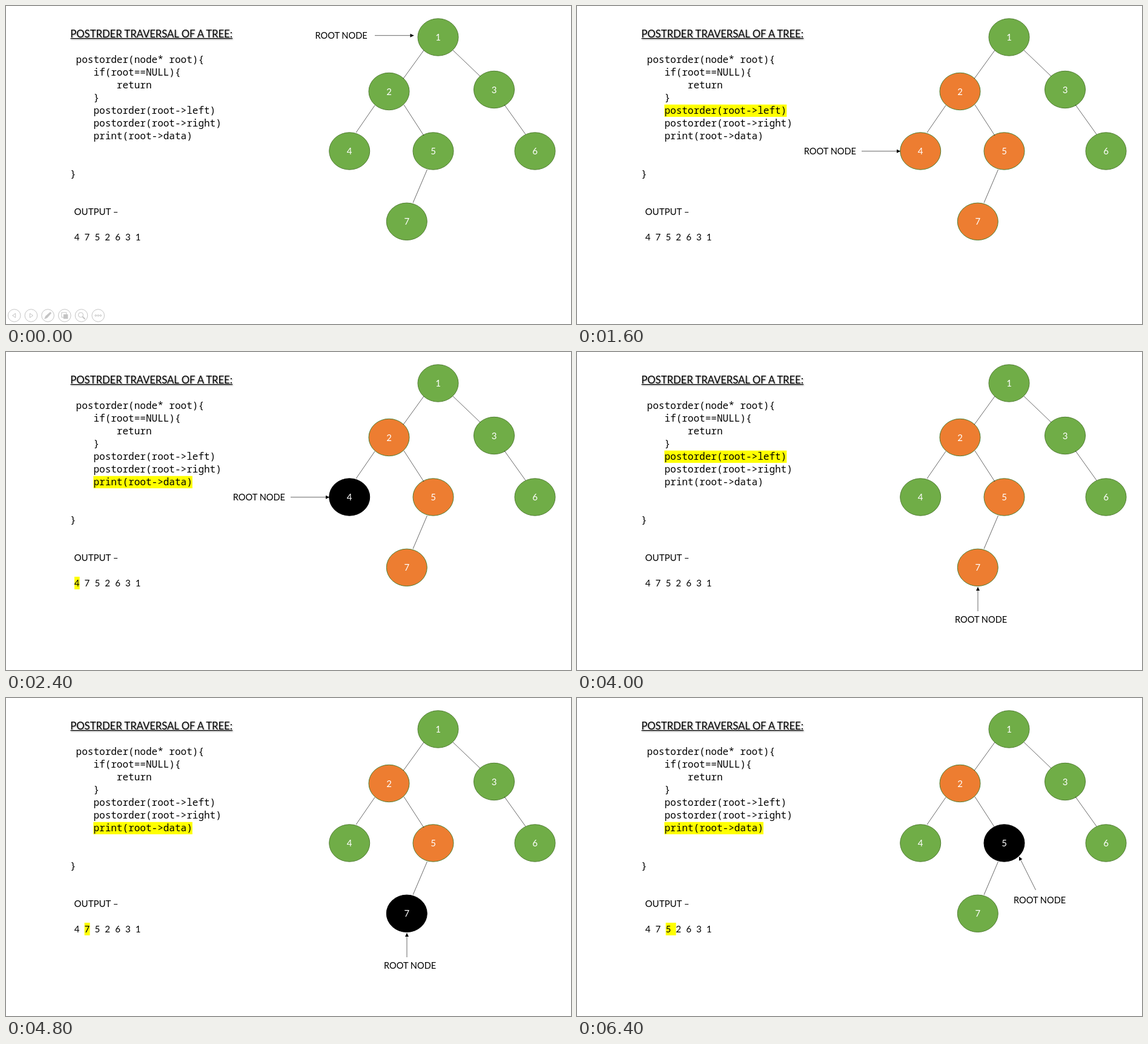
Recreate the animation shown at these times as an HTML page. Size 933 px wide and 525 px high, loop 8000 ms.

```html
<!DOCTYPE html>
<html lang="en">
<head>
<meta charset="utf-8">
<title>Tree traversal</title>
<style>
html, body { margin: 0; width: 100%; height: 100%; overflow: hidden; background: #fff; }
svg { display: block; width: 100%; height: 100%; }
text { font: 15px Lato, sans-serif; white-space: pre; }
.code { font: 16.03px "Noto Sans Mono", monospace; font-variant-ligatures: none; }
.title { font-size: 16.65px; }
.label { font-size: 14.6px; }
.head { filter: drop-shadow(1.5px 1.5px 1px #0006); }
.digit { text-anchor: middle; }
.mark { fill: #ff0; }
.line { stroke: #000; stroke-width: .6; fill: none; }
.bar { fill: #fff; stroke: #c4c4c4; }
.bar .solid { fill: #c4c4c4; stroke: none; }
</style>
</head>
<body>
<svg id="stage" viewBox="0 0 933 525" xmlns="http://www.w3.org/2000/svg"></svg>
<script>
const CODE = [
  " postorder(node* root){",
  "    if(root==NULL){",
  "        return",
  "    }",
  "    postorder(root->left)",
  "    postorder(root->right)",
  "    print(root->data)",
  "", "",
  "}"
];
const LEFT = 4, RIGHT = 5, PRINT = 6;
const CHAR = 9.618, ROW = 21;
const GREEN = "#70ad47", ORANGE = "#ed7d31", EDGE = "#507e32";
const NODES = [[713.5, 51.5], [632.5, 141], [806, 138], [567.2, 239.5],
               [705.5, 239.5], [873.5, 239.5], [661.8, 355.8]];
const EDGES = "M690 73L656 120M738 73L783 116M609 164L578 209" +
              "M657 163L690 214M823 163L858 212M695.5 270L672 325";
// label x, label baseline, arrow tail, arrow tip
const POINTERS = {
  one: [510.5, 54, 609, 48.7, 673.5, 48.7],
  two: [442.5, 140.5, 534, 135.3, 598.5, 135.3],
  four: [374.8, 245, 470, 239.7, 534, 239.7],
  five: [716.8, 336, 753.5, 313, 730, 262],
  fiveLow: [721, 339, 757.5, 317, 730, 262],
  seven: [624, 447.3, 662, 428, 662, 388]
};
// start ms, pointer, marked code row, orange nodes, printed node, output mark [x, width]
const STEPS = [
  [0, "one", 0, "", 0],
  [800, "two", LEFT, "2457", 0],
  [1600, "four", LEFT, "2457", 0],
  [2400, "four", PRINT, "257", 4, [113, 8.6]],
  [3200, "five", RIGHT, "257", 0],
  [4000, "seven", LEFT, "257", 0],
  [4800, "seven", PRINT, "25", 7, [129.6, 8.9]],
  [5600, "fiveLow", RIGHT, "25", 0],
  [6400, "fiveLow", PRINT, "2", 5, [146.6, 16.9]]
];
const LOOP = 8000;

const text = (x, y, s, cls = "", fill = "#000") =>
  `<text x="${x}" y="${y}" class="${cls}" fill="${fill}">${s.replace(/>/g, "&gt;")}</text>`;
const mark = (x, y, w, h) => `<rect class="mark" x="${x}" y="${y}" width="${w}" height="${h}"/>`;

function node([x, y], i, orange, printed) {
  const id = i + 1, black = id === printed;
  const fill = black ? "#000" : orange.includes(id) ? ORANGE : GREEN;
  return `<ellipse cx="${x}" cy="${y}" rx="33.5" ry="30.7" fill="${fill}" stroke="${black ? "#000" : EDGE}"/>`
    + text(x, y + 5.5, `${id}`, "digit", "#fff");
}

function pointer([lx, ly, x1, y1, x2, y2]) {
  const angle = Math.atan2(y2 - y1, x2 - x1) * 180 / Math.PI;
  return text(lx, ly, "ROOT NODE", "label")
    + `<path class="line" d="M${x1} ${y1}L${x2} ${y2}"/>`
    + `<path d="M0 0L-6 -3V3Z" transform="translate(${x2} ${y2}) rotate(${angle})"/>`;
}

function controls() {
  const icons = [
    '<path d="M2 -3.5V3.5L-3 0Z"/>',
    '<path d="M-2 -3.5V3.5L3 0Z"/>',
    '<path class="solid" d="M-6 6L-4 1L4 -6L6 -4L-1 4Z"/>',
    '<path d="M-5 -5H3V3H-5Z"/><path class="solid" d="M-2 -2H5.5V5.5H-2Z"/>',
    '<circle cx="-1" cy="-1" r="4"/><path d="M2 2L6 6" stroke-width="2"/>',
    [-4, 0, 4].map(x => `<circle cx="${x}" r="1.3"/>`).join("")
  ];
  return '<g class="bar">' + icons.map((icon, i) =>
    `<g transform="translate(${13.7 + 27.7 * i} 511)"><circle r="10.3"/>${icon}</g>`).join("") + "</g>";
}

function scene([start, at, row, orange, printed, out]) {
  let s = "";
  if (row) {
    const width = CODE[row].trim().length * CHAR;
    s += mark(144.3, 78.7 + row * ROW, width, 20.3);
  }
  if (out) s += mark(out[0], 371, out[1], 20.8);
  s += '<g class="head">' + text(106.3, 51.6, "POSTRDER TRAVERSAL OF A TREE:", "title")
    + '<path d="M106.5 53H374V54.2H106.5Z"/></g>';
  s += CODE.map((l, i) => text(106, 94.2 + i * ROW, l, "code")).join("");
  s += text(112.6, 345.2, "OUTPUT –");
  s += [..."4752631"].map((d, i) => text(117.1 + 16.85 * i, 387.2, d, "digit")).join("");
  s += NODES.map((p, i) => node(p, i, orange, printed)).join("");
  s += `<path class="line" d="${EDGES}"/>` + pointer(POINTERS[at]);
  return start ? s : s + controls();
}

const stage = document.getElementById("stage");
const begin = performance.now();
let shown;

function draw(now) {
  const t = Math.max(0, now - begin) % LOOP;
  const step = STEPS.findLast(s => s[0] <= t);
  if (step !== shown) stage.innerHTML = scene(shown = step);
  requestAnimationFrame(draw);
}
draw(begin);
</script>
</body>
</html>
```
